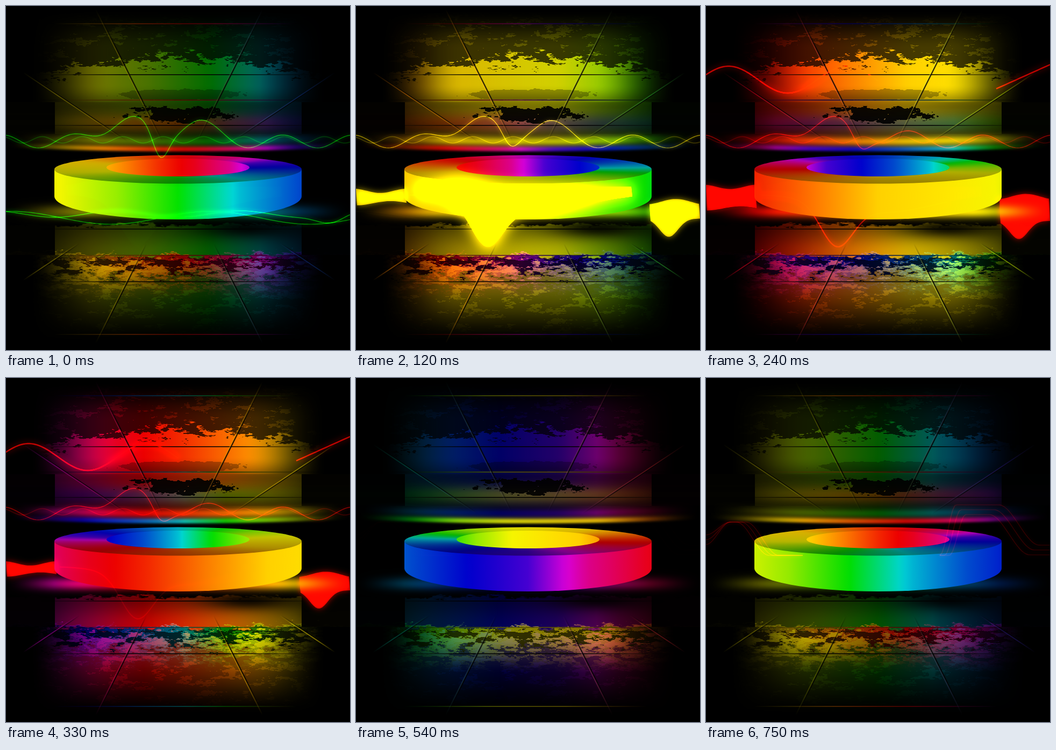
Animation, 640 px wide and 640 px high, one loop 780 ms. Source, as an HTML page with a canvas:

```html
<!DOCTYPE html>
<html lang="en">
<head>
<meta charset="utf-8">
<title>Neon ring</title>
<style>
html, body { margin: 0; height: 100%; overflow: hidden; background: #000; }
canvas { display: block; width: 640px; height: 640px; }
</style>
</head>
<body>
<canvas id="stage" width="640" height="640"></canvas>
<script>
const SIZE = 640, LOOP = 780, TICK = 30, TAU = Math.PI * 2;
const ctx = document.getElementById('stage').getContext('2d');

function makeCanvas() {
  const canvas = document.createElement('canvas');
  canvas.width = canvas.height = SIZE;
  return canvas;
}

function ramp(a, b, v) {
  const k = Math.min(1, Math.max(0, (v - a) / (b - a)));
  return k * k * (3 - 2 * k);
}
const bump = (v, centre, width) => Math.exp(-(((v - centre) / width) ** 2));
const oval = (x, y, cx, cy, rx, ry) => ((x - cx) / rx) ** 2 + ((y - cy) / ry) ** 2;

// Hues at even steps around the ring
const hues = [119, 82, 60, 54, 49, 30, 10, -7, -38, -100, -120, -142, -174, -241];
function tint(u) {
  u -= Math.floor(u);
  const step = u * (hues.length - 1), i = Math.floor(step);
  const hue = hues[i] + (hues[i + 1] - hues[i]) * (step - i);
  return `hsl(${hue}, 100%, ${45 + 5 * Math.cos(TAU * (u - .3))}%)`;
}
function addStops(gradient, phaseAt, count = 36) {
  for (let i = 0; i <= count; i++) gradient.addColorStop(i / count, tint(phaseAt(i / count)));
  return gradient;
}
// Colours from left to right: the phase in the middle, and its change to either side
const across = (c, radius, middle, spread) =>
  addStops(c.createLinearGradient(320 - radius, 0, 320 + radius, 0), s => middle + spread * (2 * s - 1));

function hash(x, y) {
  const s = Math.sin(x * 127.1 + y * 311.7) * 43758.5453;
  return s - Math.floor(s);
}
function noise(x, y) {
  const i = Math.floor(x), j = Math.floor(y), a = ramp(0, 1, x - i), b = ramp(0, 1, y - j);
  const top = hash(i, j) * (1 - a) + hash(i + 1, j) * a;
  const low = hash(i, j + 1) * (1 - a) + hash(i + 1, j + 1) * a;
  return top * (1 - b) + low * b;
}
const fbm = (x, y) =>
  .36 * noise(x, y) + .28 * noise(x * 2.1, y * 2.1) + .2 * noise(x * 4.3, y * 4.3) + .16 * noise(x * 8.7, y * 8.7);

// Worn, wet tiles: how much front and back light each point reflects
function reflect(x, y) {
  if (y > 278 && y < 345) return [0, 0];
  const d = Math.abs(x - 320), n = fbm(x / 26, y / 9);
  const ragged = (edge, size) => ramp(-2, 2, y - edge + (n - .5) * size);
  const boxed = (y > 178 && y < 238) || (y > 400 && y < 463);
  const side = boxed ? (d < 230 ? 1 - .65 * (d / 230) ** 2 : .02) : 1 - ramp(120, 275, d);
  if (y < 300) {
    const lit = ragged(98 + (d / 200) ** 2 * 20, 75);
    let body = .27 * ramp(8, 80, y) * (n > .62 ? 1.7 : 1) * (1 - lit) + lit;
    body *= 1 - .45 * ramp(145, 190, y) - .25 * ramp(190, 225, y);
    if (oval(x, y, 320, 165, 115, 10) + (n - .5) * 1.5 < 1) body *= .72;
    const hole = oval(x, y, 320, 201, 92, 13) + (n - .5) * 4 < 1 ? .08 : 1;
    const bowed = y + (d / 320) ** 2 * 8, cut = 1 - ramp(268, 276, bowed);
    const front = body * side * hole * (1 - ramp(230, 262, y)) + .8 * bump(bowed, 252, 9) * (1 - ramp(120, 320, d));
    const back = .9 * bump(bowed, 266, 6) * (1 - ramp(120, 320, d)) + .32 * bump(y, 217, 17) * side * hole;
    return [front * cut, back * cut];
  }
  const glow = bump(y, 382, 12) * (1 - ramp(170, 325, d));
  const shade = 1 - .85 * bump(x, 450, 85) * bump(y, 413, 17);
  const near = (.5 + .35 * ramp(405, 460, y)) * side * shade * ragged(406, 22) * (1 - ragged(464, 30));
  const far = .48 * side * ragged(484, 110) * (1 - ramp(515, 625, y)) * (n > .6 ? 1.4 : 1);
  const back = .6 * side * ragged(461, 30) * (1 - ramp(480, 550, y)) * (n > .48 ? 1 : .35);
  return [glow + near + far, back];
}

// Tile seams: straight lines in perspective
function drawSeams(c, layer) {
  const seam = (x1, y1, x2, y2, alpha, width, cut) => {
    c.globalCompositeOperation = cut ? 'destination-out' : 'source-over';
    const fade = c.createLinearGradient(x1, y1, x2, y2);
    [0, alpha, alpha, 0].forEach((a, i) => fade.addColorStop(i / 3, `rgba(0,0,0,${a})`));
    c.strokeStyle = fade;
    c.lineWidth = width;
    c.beginPath();
    c.moveTo(x1, y1);
    c.lineTo(x2, y2 + .01);
    c.stroke();
  };
  for (const reach of [-284, 294]) {
    for (const depth of [1, 1.5, 2, 3]) {
      const y = 317 + reach / depth;
      seam(20, y, 620, y, 1, 1.5, true);
      if (layer && depth < 3 && depth % 1 === 0) seam(90, y, 540, y, .6, 1.2);
    }
    for (const slope of [-1.5, -.5, .5, 1.5]) {
      const start = reach < 0 ? -65 : 125;
      const end = Math.sign(reach) * Math.min(310, 290 / Math.abs(slope));
      const joint = shift => [322 + slope * start + shift, 317 + start, 322 + slope * end + shift, 317 + end];
      seam(...joint(2), .8, 2.5, true);
      seam(...joint(0), layer ? .12 : .4, 1.8);
    }
  }
}

const masks = [0, 1].map(layer => {
  const canvas = makeCanvas(), c = canvas.getContext('2d'), image = c.createImageData(SIZE, SIZE);
  for (let i = 0; i < SIZE * SIZE; i++)
    image.data[i * 4 + 3] = 255 * Math.min(1, reflect(i % SIZE, Math.floor(i / SIZE))[layer]);
  c.putImageData(image, 0, 0);
  drawSeams(c, layer);
  return canvas;
});
const layer = makeCanvas(), paint = layer.getContext('2d');

function drawTiles(u) {
  const power = Math.min(1, .72 + .4 * Math.cos(TAU * (u - .35)));
  const fills = [across(paint, 230, u + .04, -.16), across(paint, 230, u + .5, .2)];
  ctx.globalCompositeOperation = 'lighter';
  fills.forEach((fill, i) => {
    paint.globalCompositeOperation = 'copy';
    paint.fillStyle = fill;
    paint.fillRect(0, 0, SIZE, SIZE);
    paint.globalCompositeOperation = 'destination-in';
    paint.drawImage(masks[i], 0, 0);
    ctx.globalAlpha = i ? .9 : power;
    ctx.drawImage(layer, 0, 0);
  });
  ctx.globalAlpha = 1;
  ctx.globalCompositeOperation = 'source-over';
}

function fillOval(cy, rx, ry, style) {
  ctx.fillStyle = style;
  ctx.beginPath();
  ctx.ellipse(320, cy, rx, ry, 0, 0, TAU);
  ctx.fill();
}

function drawRing(u) {
  ctx.fillStyle = across(ctx, 230, u, -.16);
  ctx.beginPath();
  ctx.moveTo(90, 304);
  ctx.lineTo(90, 354);
  ctx.ellipse(320, 354, 230, 43, 0, Math.PI, 0, true);
  ctx.lineTo(550, 304);
  ctx.fill();

  ctx.save();
  ctx.translate(320, 304);
  ctx.scale(1, 26.5 / 230);
  ctx.fillStyle = addStops(ctx.createConicGradient(0, 0, 0), s => u + .75 + s + .05 * Math.cos(TAU * s), 48);
  ctx.beginPath();
  ctx.arc(0, 0, 230, 0, TAU);
  ctx.fill();
  ctx.restore();

  const shade = ctx.createLinearGradient(0, 278, 0, 331);
  shade.addColorStop(0, 'rgba(0,0,0,.1)');
  shade.addColorStop(1, 'rgba(0,0,0,.42)');
  fillOval(304, 230, 26.5, shade);
  fillOval(300.5, 133, 16.5, across(ctx, 133, u + .5, .16));
}

// Wisps of light: curves y(x), drawn as glowing lines or filled ribbons
function plot(from, to, curve) {
  const dir = Math.sign(to - from);
  for (let x = from; dir * x <= dir * to; x += 4 * dir) ctx.lineTo(x, curve(x));
}
function glow(alpha, blur) {
  ctx.globalAlpha = Math.max(0, alpha);
  ctx.shadowBlur = blur;
  ctx.beginPath();
}
function line(alpha, width, from, to, curve) {
  glow(alpha, width * 5);
  ctx.lineWidth = width;
  plot(from, to, curve);
  ctx.stroke();
}
function ribbon(alpha, blur, from, to, top, bottom) {
  glow(alpha, blur);
  plot(from, to, top);
  plot(to, from, bottom);
  ctx.fill();
}

function drawWisps(t) {
  const wave = (x, peak, length) => Math.cos(TAU * (x - peak) / length);
  ctx.save();
  ctx.globalCompositeOperation = 'lighter';
  ctx.strokeStyle = ctx.fillStyle = ctx.shadowColor = tint(Math.min(.5, t / LOOP * 1.65));

  // Twin crests above the ring
  const dip = 46 - 22 * ramp(0, 120, t), second = 38 - 26 * ramp(100, 260, t);
  const upper = .6 * (1 - ramp(380, 540, t));
  line(upper, 1.2, 0, 640, x => 252 + 12 * wave(x, 450, 130)
    - 42 * bump(x, 222, 55) - second * bump(x, 348, 45) + dip * bump(x, 287, 20));
  line(upper * .5, 1, 0, 640, x => 249 + 6 * wave(x, 30, 75));

  // Ripples along the floor
  const ripple = .6 * (1 - ramp(30, 130, t));
  line(ripple, 1.3, 0, 640, x => 387 + 6 * wave(x, 320, 230) + 16 * bump(x, 605, 35));
  line(ripple, 1.2, 0, 640, x => 394 + 12 * wave(x, 195, 370));

  // High strands
  const high = .7 * ramp(130, 230, t) * (1 - ramp(430, 530, t));
  line(high, 2.4, 0, 320, x => 137 + 20 * ramp(240, 420, t) - 25 * wave(x, 42, 220));
  line(high, 2.4, 540, 640, x => 109 + .45 * (640 - x));

  // Ribbons beside the ring
  const beside = .65 * ramp(50, 120, t) * (1 - ramp(430, 530, t)), swell = bump(t, 220, 110);
  ribbon(beside, 12, 0, 94, x => 350 - 14 * swell + 4 * wave(x, 45, 100), x => 359 + 18 * swell + 4 * wave(x, 0, 130));
  ribbon(beside, 12, 546, 640, x => 372 - 18 * swell + 5 * wave(x, 540, 110), x => 392 + 8 * swell + 34 * bump(x, 582, 24));

  // Flash that drips down the front wall
  const drip = x => 350 + 76 * bump(x, 243, 42) + 34 * bump(x, 330, 130);
  ribbon(bump(t, 120, 55), 24, 112, 514, x => 336 - 16 * bump(x, 190, 60), drip);
  line(.6 * bump(t, 240, 70), 2, 100, 450, drip);

  // Loose loops
  const loops = .45 * bump(t, 685, 75);
  for (let i = 0; i < 3; i++) {
    const shift = i * 9;
    line(loops, 1.2, 0, 180, x => 330 - 62 * (1 - ramp(75, 135, x + shift)) + (24 + shift) * (1 - ramp(0, 45, x)));
    line(loops, 1.2, 435, 640, x => 330 - (94 - shift) * ramp(435, 465, x - shift) + 75 * ramp(545, 620, x + shift));
  }
  ctx.restore();
}

function draw() {
  const time = Math.floor(performance.now() / TICK + .05) * TICK % LOOP;
  ctx.fillStyle = '#000';
  ctx.fillRect(0, 0, SIZE, SIZE);
  drawTiles(time / LOOP);
  drawRing(time / LOOP);
  drawWisps(time);
  requestAnimationFrame(draw);
}
draw();
</script>
</body>
</html>
```
